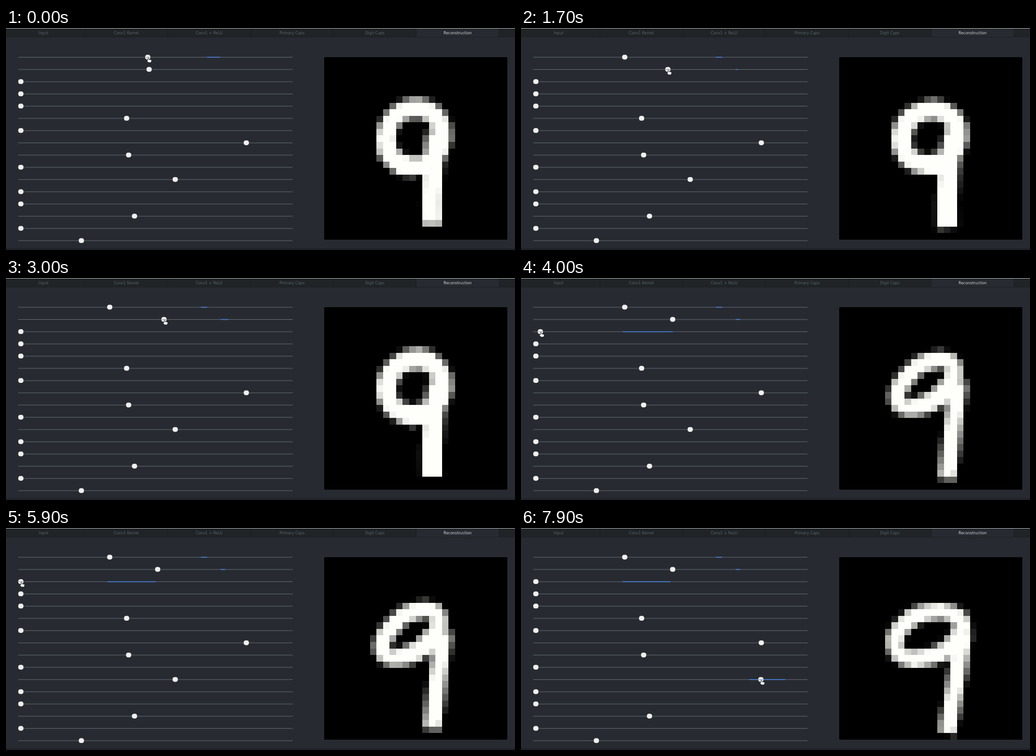
Animation, 1131 px wide and 495 px high, one loop 8000 ms. Source, as an HTML page with a canvas:

```html
<!DOCTYPE html>
<html lang="en">
<head>
<meta charset="utf-8">
<title>Capsule reconstruction</title>
<style>
  html, body { margin: 0; width: 100%; height: 100%; overflow: hidden; background: #272b31; }
  body { position: relative; }
  nav { position: absolute; inset: 0 0 auto; height: 21px; overflow: hidden; background: #202427;
        border-top: 1px solid #c9ccc6; box-sizing: border-box; border-bottom: 1px solid #1c1f22; }
  nav span { position: absolute; top: 0; width: 184px; height: 20px; box-sizing: border-box;
             border-right: 1px solid #191c1f; color: #58656a; text-align: center;
             font: 8.35px/21px "DejaVu Sans", sans-serif; }
  nav span:last-child { background: #272b31; color: #d3d7d6; }
  footer { position: absolute; inset: 491px 0 0; background: #20242a; }
  canvas { position: absolute; left: 0; top: 0; }
  #digit { left: 707px; top: 65px; width: 407px; height: 407px; background: #000;
           border-radius: 2px; image-rendering: pixelated; }
</style>
</head>
<body>
<nav></nav>
<footer></footer>
<canvas id="digit" width="28" height="28"></canvas>
<canvas id="panel" width="1131" height="495"></canvas>
<script>
const LOOP = 8000, STEP = 100;
const tabs = ['Input', 'Conv1 Kernel', 'Conv1 + ReLU', 'Primary Caps', 'Digit Caps', 'Reconstruction'];
document.querySelector('nav').innerHTML =
  tabs.map((name, i) => `<span style="left:${i * 184 - 8}px">${name}</span>`).join('');

const context = id => document.getElementById(id).getContext('2d');
const panel = context('panel'), digit = context('digit');
const mix = (a, b, k) => a + (b - a) * k;
const progress = (t, [start, end]) => Math.max(0, Math.min(1, (t - start) / (end - start)));
const easeOut = p => 1 - (1 - p) ** 3;

// Each gesture: the pointer reaches a slider, then drags it; origin is where its blue bar begins
const MIN = 33;
const resting = [315, 318, MIN, MIN, MIN, 268, MIN, 534, 272.5, MIN, 376, MIN, MIN, 285.5, MIN, 167.5];
const gestures = [
  { slider: 0, reach: [-1, 0], drag: [100, 800], to: 230.5, sway: 0, waves: 0, origin: 447 },
  { slider: 1, reach: [900, 1400], drag: [1500, 3100], to: 337, sway: 15.5, waves: 7, origin: 477 },
  { slider: 2, reach: [3100, 3700], drag: [3900, 5400], to: MIN, sway: 48, waves: 1, origin: 226 },
  { slider: 10, reach: [6100, 6900], drag: [7100, 7900], to: 533, sway: 0, waves: 0, origin: 507 }
];
const rowY = i => 65 + i * 27.27;

function handleX(gesture, t) {
  const p = progress(t, gesture.drag);
  return mix(resting[gesture.slider], gesture.to, p) + gesture.sway * Math.sin(Math.PI * gesture.waves * p);
}

function pointerAt(t) {
  const grip = g => [handleX(g, t) + 3, rowY(g.slider) + 7];
  const current = gestures.findLastIndex(g => g.reach[0] <= t);
  const there = grip(gestures[current]);
  if (current === 0) return there;
  const p = easeOut(progress(t, gestures[current].reach));
  return grip(gestures[current - 1]).map((v, i) => mix(v, there[i], p));
}

function drawSliders(handles, t) {
  const started = gestures.filter(g => g.slider === 0 || t > g.drag[0]);
  const focus = started.at(-1).slider;
  handles.forEach((x, i) => {
    const y = rowY(i), active = started.find(g => g.slider === i);
    const bar = (color, left, right, height) => {
      panel.fillStyle = color;
      panel.fillRect(left, y + .2 - height / 2, right - left, height);
    };
    if (i === focus) bar('#747a83', 27, 637, 1);
    else bar('#4b5058', 27, 637, 2);
    if (active) {
      const end = 332 + (x - MIN) * .51;
      bar('#4a80e0', Math.min(active.origin, end), Math.max(active.origin, end), 1.8);
    }
    panel.beginPath();
    panel.roundRect(x - 6, y - 5.5, 12, 11, 4.8);
    panel.fillStyle = '#f0f0ee';
    panel.fill();
    panel.lineWidth = .6;
    panel.strokeStyle = '#1b1e2280';
    panel.stroke();
    if (i === focus) bar('#85898c', x - 5, x + 5, 1);
  });
}

const hand = new Path2D('M-3-5Q-2-6-1-5V-2L4-1Q5 0 4 3L3 5H-2L-5 1Q-5-1-3 0Z');
function drawPointer([x, y]) {
  panel.save();
  panel.translate(x + .5, y);
  panel.scale(1.1, 1);
  panel.fillStyle = '#fff';
  panel.fill(hand);
  panel.lineWidth = .8;
  panel.strokeStyle = '#15181b';
  panel.stroke(hand);
  panel.restore();
}

// The digit is one pen stroke: a leaning bowl and a bent stem, measured in cells
const HEEL = 16.5;
const upright = { cx: 13.75, cy: 12.25, rx: 4.3, ry: 4.55, lean: .3, neck: 17.2, bend: 16.3, foot: 25.8, nib: 2.95 };
const slanted = { cx: 13.2, cy: 11.75, rx: 3.7, ry: 3.75, lean: 2.4, neck: 18.3, bend: 17.5, foot: 26.3, nib: 2.6 };
const squash = { cx: .1, ry: -.3, lean: .2, neck: .4, foot: .35, nib: .15 };
const tighten = { cx: .3, ry: -.4, nib: -.2 };
const widen = { cx: .4, cy: .2, rx: 1.15, ry: -.1, lean: -.5, neck: .7, bend: .8, foot: .6 };

function adjust(pose, change, amount) {
  const result = { ...pose };
  for (const key in change) result[key] += change[key] * amount;
  return result;
}

function shape(handles, t) {
  if (t <= gestures[2].drag[0]) {
    return adjust(upright, squash, (315 - handles[0]) / 85 - (handles[1] - 318) / 100);
  }
  return adjust(adjust(slanted, tighten, (handles[2] - MIN) / 100), widen, (handles[10] - 376) / 157);
}

function drawDigit({ cx, cy, rx, ry, lean, neck, bend, foot, nib }) {
  const shear = lean / ry;
  digit.clearRect(0, 0, 28, 28);
  digit.beginPath();
  digit.setTransform(1, 0, -shear, 1, shear * cy, 0);
  digit.ellipse(cx, cy, rx, ry, 0, 0, 2 * Math.PI);
  digit.closePath();
  digit.resetTransform();
  digit.moveTo(neck, cy - .5);
  digit.quadraticCurveTo(bend, 17, HEEL, foot);
  digit.filter = 'blur(.42px)';
  digit.lineWidth = nib;
  digit.strokeStyle = '#fefffa';
  digit.stroke();
}

function draw() {
  const t = Math.floor(performance.now() % LOOP / STEP) * STEP;
  const handles = resting.slice();
  for (const g of gestures) handles[g.slider] = handleX(g, t);
  panel.clearRect(0, 0, 1131, 495);
  drawSliders(handles, t);
  drawPointer(pointerAt(t));
  drawDigit(shape(handles, t));
  requestAnimationFrame(draw);
}
draw();
</script>
</body>
</html>
```
